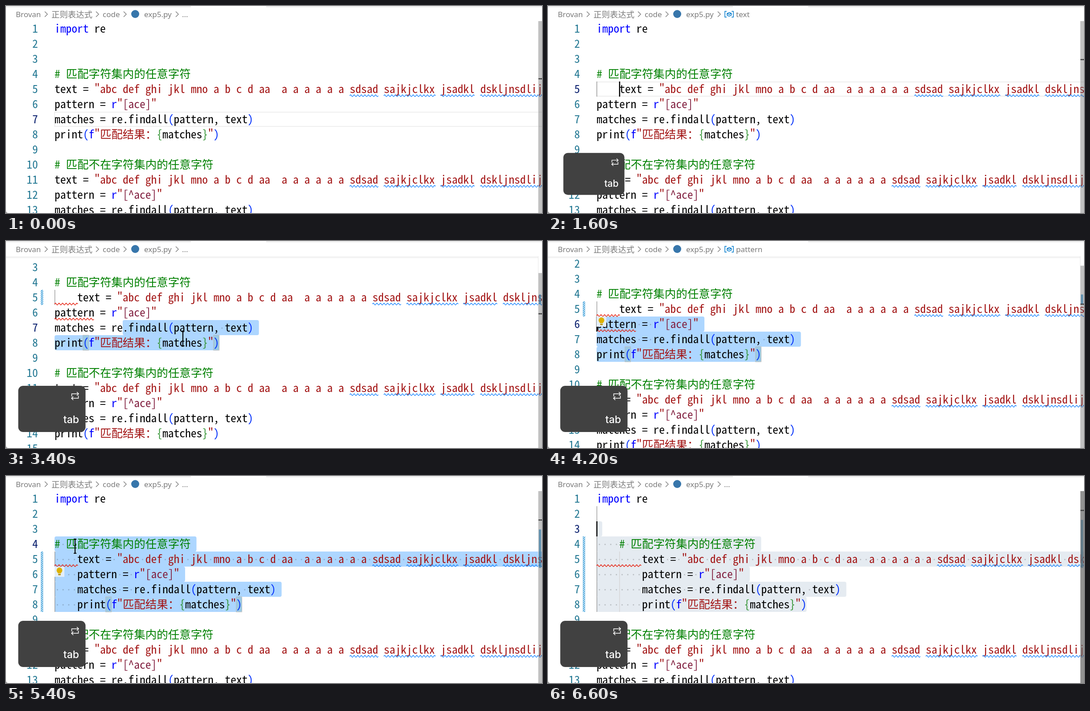
An HTML page that plays this animation: 1203x466 px, repeating every 6800 ms.

```html
<!DOCTYPE html>
<html lang="zh">
<head>
<meta charset="utf-8">
<title>Editor: indenting with tab</title>
<style>
  html, body { margin: 0; width: 100%; height: 100%; overflow: hidden; background: #fff; }
  svg { display: block; }
  .crumb { font: 17px "Noto Sans", "Noto Sans CJK SC", "Open Sans", sans-serif; fill: #7b7b7b; }
  .crumb .han { font: 18.4px "Noto Sans CJK SC", "Noto Sans CJK", sans-serif; }
  .chevron, .wave, .icon { fill: none; }
  .chevron { stroke: #7b7b7b; stroke-width: 1.4; }
  .icon { stroke-width: 1.5; }
  .key text { font: 500 23px Inter, "Open Sans", sans-serif; fill: #fff; }
</style>
</head>
<body>
<svg width="1203" height="466" viewBox="0 0 1203 466">
  <defs>
    <clipPath id="pane"><rect y="34" width="1203" height="432"/></clipPath>
    <pattern id="hatch" width="4.500" height="4.500" patternUnits="userSpaceOnUse">
      <path d="M-1 5.500L5.500 -1M-1 1L1 -1M3.500 5.500L5.500 3.500" stroke="#2090d3" stroke-width="1.6"/>
    </pattern>
    <linearGradient id="shade" x2="0" y2="1">
      <stop stop-color="#000" stop-opacity=".08"/><stop offset="1" stop-color="#000" stop-opacity="0"/>
    </linearGradient>
  </defs>
  <path d="M0 0H415V3H0ZM584 0H1203V3H584Z" fill="#ededed"/>
  <g class="crumb">
    <text x="22" y="25">Brovan</text>
    <text x="102" y="25.5" class="han">正则表达式</text>
    <text x="217" y="25">code</text>
    <circle cx="290" cy="18" r="9" fill="#3776ab"/>
    <text x="310" y="25">exp5.py</text>
    <path class="chevron" d="M87 12.5l6 6l-6 6M202 12.5l6 6l-6 6M264 12.5l6 6l-6 6M381 12.5l6 6l-6 6"/>
    <g id="symbol"></g>
  </g>
  <g clip-path="url(#pane)"><g id="code"></g></g>
  <g id="chrome"></g>
  <path d="M0 460Q0 466 6 466H0Z" fill="#999"/>
  <g id="key" class="key">
    <rect x="27.500" y="326" width="151" height="104" rx="11" fill="#414141"/>
    <path class="icon" stroke="#fff" d="M159 340l4 4l-4 4M163 344H147.500V350M151 350l-4 4l4 4M147 354H162.500V348"/>
    <text x="164" y="410" text-anchor="end">tab</text>
  </g>
</svg>
<script>
const LOOP = 6800;
const COL = 12.74, ROW = 34, LEFT = 109, RULER = 21.6;
const MONO = '"Noto Sans Mono CJK SC", "Noto Sans Mono", "DejaVu Sans Mono", monospace';
const HAN = '"Noto Sans CJK SC", "Noto Sans CJK", sans-serif';
const INK = '#000', BLUE = '#00f', RED = '#a31515', WINE = '#811f3f',
      GREEN = '#008000', PAREN = '#0431fa', BRACE = '#319331';

// Latin type size whose advance is exactly one column
const probe = document.createElement('canvas').getContext('2d');
probe.font = '100px ' + MONO;
const LATIN = 100 * COL / probe.measureText('0').width;

const sample = [[INK, 'text = '], [RED, '"abc def ghi jkl mno a b c d aa  a a a a a a sdsad sajkjclkx jsadkl dskljnsdlij']];
const pattern = set => [[INK, 'pattern = '], [BLUE, 'r'], [RED, '"'], [WINE, set], [RED, '"']];
const call = [[INK, 'matches = re.findall'], [PAREN, '('], [INK, 'pattern, text'], [PAREN, ')']];
const output = [[INK, 'print'], [PAREN, '('], [BLUE, 'f'], [RED, '"匹配结果：'], [BRACE, '{'],
                [INK, 'matches'], [BRACE, '}'], [RED, '"'], [PAREN, ')']];
const lines = [
  [[BLUE, 'import'], [INK, ' re']], [], [],
  [[GREEN, '# 匹配字符集内的任意字符']], sample, pattern('[ace]'), call, output, [],
  [[GREEN, '# 匹配不在字符集内的任意字符']], sample, pattern('[^ace]'), call, output, []
];

const PRESSED = 0.908;
const SELECTION_END = 8;
const steps = [
  [0, { active: 7, caret: null, crumb: '', indent: {}, key: 0, dirty: null, error: false, patternError: false,
        words: false, brackets: null, scroll: 0, sel: null, dim: false, mouse: null, bulb: false }],
  [1200, { active: 5, caret: [5, 0] }],
  [1400, { crumb: 'text' }],
  [1600, { caret: [5, 4], indent: { 5: 4 }, key: PRESSED }],
  [1800, { key: 1 }],
  [2000, { dirty: [5, 5] }],
  [2200, { error: true, patternError: true }],
  [2400, { active: 7, caret: [7, 22] }],
  [2600, { crumb: '', words: true, brackets: [7, 20, 34] }],
  [3000, { scroll: 60, words: false, active: 8, caret: [8, 29], brackets: [8, 5, 28] }],
  [3200, { sel: [8, 10], caret: null, mouse: [432, 232] }],
  [3400, { sel: [7, 12], active: 7, mouse: [397, 220] }],
  [3600, { sel: [6, 8], active: 6, mouse: [213, 170] }],
  [3800, { sel: [6, 0], mouse: [112, 164] }],
  [4000, { crumb: 'pattern', caret: [6, 0], mouse: null }],
  [4200, { scroll: 34, bulb: true }],
  [4400, { scroll: 0 }],
  [4600, { indent: { 5: 4, 6: 4, 7: 4, 8: 4 }, brackets: [8, 9, 32], dirty: [5, 8], key: PRESSED }],
  [4800, { key: 1, crumb: '' }],
  [5000, { patternError: false }],
  [5200, { sel: [5, 4], active: 5, caret: null, mouse: [160, 190] }],
  [5400, { sel: [4, 0], active: 4, mouse: [155, 158] }],
  [5600, { sel: [3, 0], active: 3, mouse: [128, 122] }],
  [5800, { caret: [3, 0], mouse: null, bulb: false }],
  [6000, { indent: { 4: 4, 5: 8, 6: 8, 7: 8, 8: 8 }, dirty: [4, 8], brackets: null, key: PRESSED }],
  [6200, { key: 1 }],
  [6600, { dim: true }]
];
const states = [];
for (const [, change] of steps) states.push({ ...states.at(-1), ...change });

const colX = col => LEFT + col * COL;
const rect = (x, y, w, h, fill, more = '') =>
  `<rect x="${x}" y="${y}" width="${w}" height="${h}" fill="${fill}" ${more}/>`;
const mark = (line, col, span, fill, more) => rect(colX(col), line * ROW, span * COL, ROW, fill, more);
const rulerY = line => 34 + (line - 1) * RULER;
const indentOf = (s, line) => s.indent[line] || 0;

// One character per column; wide glyphs take two
const cells = (s, line) => ' '.repeat(indentOf(s, line)) +
  lines[line - 1].map(t => t[1]).join('').replace(/[^\x00-\x7f]/g, 'ww');

function wave(line, col, span, color) {
  const n = Math.round(span * COL / 4);
  return `<path class="wave" stroke="${color}" stroke-width="1.5" d="M${colX(col)} ${line * ROW + 32}q2 -4 4 0${'t4 0'.repeat(n - 1)}"/>`;
}

function lineText(s, line) {
  const y = line * ROW + 26;
  let col = indentOf(s, line), out = '';
  for (const [fill, text] of lines[line - 1]) {
    for (const [run] of text.matchAll(/[^\x00-\x7f]+|[!-~]+| +/g)) {
      const wide = run > '\x7f';
      if (run[0] !== ' ') {
        const font = wide ? `font-family='${HAN}' font-size="${2 * COL}"` : `font-family='${MONO}' font-size="${LATIN}"`;
        out += `<text x="${colX(col)}" y="${y}" fill="${fill}" ${font}>${run}</text>`;
      }
      col += run.length * (wide ? 2 : 1);
    }
  }
  const number = line === s.active ? '#0b216f' : '#237893';
  return out + `<text x="71.800" y="${y}" text-anchor="end" fill="${number}" font-family='${MONO}' font-size="${LATIN}">${line}</text>`;
}

function selection(s) {
  let out = '';
  for (let line = s.sel[0]; line <= SELECTION_END; line++) {
    const row = cells(s, line), from = line === s.sel[0] ? s.sel[1] : 0;
    const to = row.length + (line < SELECTION_END ? 1 : 0);
    out += mark(line, from, to - from, s.dim ? '#e5ebf1' : '#add6ff', 'rx="4"');
    for (let c = from; c < row.length; c++)
      if (row[c] === ' ') out += `<circle cx="${colX(c + .5)}" cy="${line * ROW + 18}" r="1.500" fill="#333" opacity=".25"/>`;
  }
  return out;
}

function guides(s) {
  let out = '';
  const guide = (x, from, to, fill) => rect(x, from * ROW, 1.3, (to - from) * ROW, fill);
  const rows = Object.keys(s.indent).map(Number);
  if (rows.length) out += guide(LEFT, rows[0] === 4 ? 2 : rows[0], rows.at(-1) + 1, '#939393');
  if (s.indent[5] === 8) out += guide(colX(4), 5, 9, '#d3d3d3');
  return out;
}

function waves(s) {
  let out = '';
  for (const line of [5, 11]) {
    const row = cells(s, line), start = row.indexOf('sdsad');
    for (const m of row.slice(start).matchAll(/\S+/g))
      out += wave(line, start + m.index, m[0].length, '#1a85ff');
  }
  if (s.error) out += wave(5, 0, indentOf(s, 5), '#e51400');
  if (s.patternError) out += wave(6, indentOf(s, 6), 7, '#e51400');
  return out;
}

function bulb() {
  return rect(LEFT, 204, 22, 23, '#e3eefa') +
    '<path d="M120 206a6.500 6.500 0 0 1 4 11.500V219H116V217.500A6.500 6.500 0 0 1 120 206Z" fill="#ddb100"/>' +
    rect(117, 220, 6, 3.5, '#b99a20', 'rx="1"');
}

function code(s) {
  let out = '';
  if (!s.sel) out += rect(LEFT, s.active * ROW + 1, 1100, ROW - 2, 'none', 'stroke="#eee" stroke-width="2"');
  if (s.words) for (const line of [6, 12])
    out += mark(line, 0, 7, '#c3d8e6') + mark(line + 1, 21, 7, '#d5d5d5');
  if (s.sel) out += selection(s);
  if (s.brackets) for (const col of s.brackets.slice(1))
    out += mark(s.brackets[0], col, 1, '#006400', 'fill-opacity=".1" stroke="#b9b9b9" stroke-width="1"');
  out += guides(s);
  if (s.dirty) out += rect(78, s.dirty[0] * ROW, 5.5, (s.dirty[1] - s.dirty[0] + 1) * ROW, 'url(#hatch)');
  lines.forEach((_, i) => out += lineText(s, i + 1));
  out += waves(s);
  if (s.caret) out += rect(colX(s.caret[1]) - .5, s.caret[0] * ROW, 2.5, ROW, '#000');
  if (s.bulb) out += bulb();
  return out;
}

function chrome(s) {
  let out = s.scroll ? rect(0, 35, 1195, 5, 'url(#shade)') : '';
  out += rect(1194, 34, 1, 432, '#e8e8e8');
  if (s.dirty) out += rect(1196, rulerY(s.dirty[0]), 5, (s.dirty[1] - s.dirty[0] + 1) * RULER, '#2090d3', 'opacity=".7"');
  if (s.words) for (const line of [6, 7, 12, 13]) out += rect(1200, rulerY(line), 3, RULER, '#a0a0a0', 'opacity=".8"');
  // The scroll thumb runs past the bottom edge and darkens under the pointer
  out += rect(1195, 34 + s.scroll * RULER / ROW, 8, 432, '#646464', `opacity="${s.dim ? .7 : .4}"`);
  out += rect(1195, rulerY(s.active) - 1, 8, 2.5, '#424242');
  if (s.mouse) {
    const [x, y] = s.mouse;
    out += `<path class="icon" stroke="#000" style="stroke-width:2.2" d="M${x} ${y - 16}v32m-3 0h6m-6 -32h6"/>`;
  }
  return out;
}

function symbol(name) {
  if (!name) return '<text x="395" y="25">...</text>';
  return `<path class="icon" stroke="#007acc" d="M401 12h-4v13h4M412 12h4v13h-4M402 17l5 -2.500l4.500 2v4l-5 2.500l-4.500 -2ZM402 17l4.500 2l5 -2.500"/>
    <text x="422" y="25">${name}</text>`;
}

const [symbolEl, codeEl, chromeEl, keyEl] = ['symbol', 'code', 'chrome', 'key'].map(id => document.getElementById(id));
function draw(s) {
  symbolEl.innerHTML = symbol(s.crumb);
  codeEl.innerHTML = code(s);
  codeEl.setAttribute('transform', `translate(0 ${-s.scroll})`);
  chromeEl.innerHTML = chrome(s);
  keyEl.setAttribute('visibility', s.key ? 'visible' : 'hidden');
  keyEl.setAttribute('transform', `translate(103 378) scale(${s.key || 1}) translate(-103 -378)`);
}

let shown = -1;
function tick() {
  const t = performance.now() % LOOP;
  const now = steps.findLastIndex(step => step[0] <= t);
  if (now !== shown) draw(states[shown = now]);
  requestAnimationFrame(tick);
}
tick();
</script>
</body>
</html>
```
